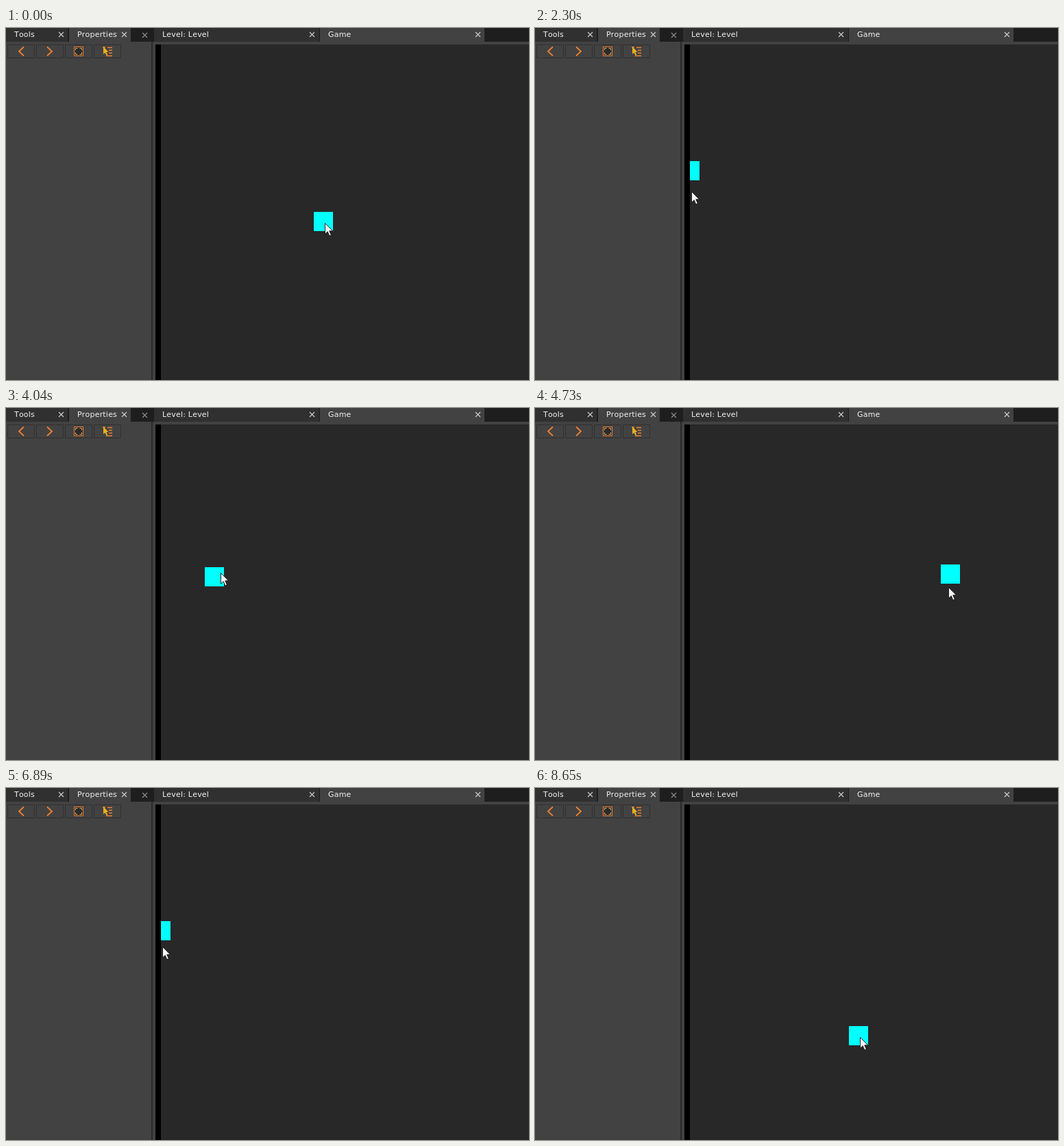
These frames come from a looping animation (763 px wide and 513 px high, 9130 ms). An HTML page:

```html
<!DOCTYPE html>
<html lang="en">
<head>
<meta charset="utf-8">
<title>Editor</title>
<style>
  html, body { margin: 0; width: 100%; height: 100%; overflow: hidden; background: #424242; }
  svg { display: block; }
  text { font: 11px "DejaVu Sans", sans-serif; font-kerning: none; letter-spacing: .2px; fill: #f2f2f2; }
  .close { stroke: #d0d0d0; stroke-width: 1.1; fill: none; }
  .button { fill: #424242; stroke: #303030; }
  .orange { stroke: #f08030; fill: none; }
</style>
</head>
<body>
<svg width="763" height="513" viewBox="0 0 763 513">
  <defs>
    <path id="cross" d="M-3.5-3.5l7 7M3.5-3.5l-7 7"/>
    <path id="button" d="M.5.5h39v19h-39z"/>
    <clipPath id="view"><path d="M226 24H763V513H226Z"/></clipPath>
  </defs>
  <path fill="#424242" d="M0 0H763V513H0Z"/>
  <path fill="#1e1e1e" d="M0 0H763V20H0Z"/>
  <path fill="#303030" d="M0 0H90V20H0ZM216 0H457V20H216Z"/>
  <path fill="#424242" d="M92 0H182V20H92ZM458 0H698V20H458Z"/>
  <path fill="#2b2b2b" d="M212 20H214V513H212Z"/>
  <path fill="#000" d="M218 24H226V513H218Z"/>
  <path fill="#282828" d="M226 24H763V513H226Z"/>

  <text x="12" y="13">Tools</text>
  <text x="104" y="13">Properties</text>
  <text x="228" y="13">Level: Level</text>
  <text x="470" y="13">Game</text>
  <g class="close">
    <use href="#cross" x="80.5" y="9.5"/>
    <use href="#cross" x="172.5" y="9.5"/>
    <use href="#cross" x="202.5" y="10.5" opacity=".65"/>
    <use href="#cross" x="446.5" y="9.5"/>
    <use href="#cross" x="688.5" y="9.5"/>
  </g>

  <g class="button">
    <use href="#button" x="2" y="24"/>
    <use href="#button" x="44" y="24"/>
    <use href="#button" x="86" y="24"/>
    <use href="#button" x="128" y="24"/>
  </g>
  <path class="orange" stroke-width="1.8" d="M26 27.5L19 34L26 40.5M60 27.5L67 34L60 40.5"/>
  <path fill="#2a2a2a" stroke="#f08030" d="M99.5 27.5h13v13h-13z"/>
  <path stroke="#d8b070" fill="none" d="M101.5 32.5v-3h3M107.5 29.5h3v3M110.5 35.5v3h-3M104.5 38.5h-3v-3"/>
  <path class="orange" stroke-width="1.6" d="M141 28H145M148 28.5H155M150 32.5H155M150 36.5H155M146 40.5H155"/>
  <path fill="#e8b020" d="M142 27v11l2.5-2 2 4 1.8-1-2-4h3.2z"/>

  <g clip-path="url(#view)"><rect id="box" width="28" height="28" fill="#0ff"/></g>
  <path id="cursor" fill="#f4f4f6" stroke="#151515" stroke-width=".9" stroke-linejoin="round"
        d="M.5.5V16.2L4.2 12.8L6.8 18.8L9.4 17.7L6.8 11.8H11.6Z"/>
</svg>
<script>
const LOOP = 9130, START = 465, STEP = 79.1;
const WALL = 226, HALF = 14, OFFSET = 2;

// Where the pointer turns: step, x, y.
const turns = [
  [0, 465, 284], [5, 214, 347], [11, 228, 237], [12, 228, 229], [18, 220, 95], [24, 228, 238],
  [29, 420, 367], [33, 585, 316], [34, 608, 290], [37, 643, 143], [42, 420, 374],
  [45, 306, 248], [46, 313, 240], [49, 530, 158], [52, 610, 228], [61, 500, 338],
  [63, 376, 265], [64, 328, 223], [73, 208, 49], [82, 228, 231], [93, 300, 430],
  [99, 547, 260], [103, 474, 363]
];
const last = turns.length - 1;

const box = document.getElementById("box");
const cursor = document.getElementById("cursor");

function slope(i, axis) {
  const a = turns[i], b = turns[i + 1];
  return a && b ? (b[axis] - a[axis]) / (b[0] - a[0]) : 0;
}

// Harmonic tangents keep the curve from overshooting its turns.
function tangent(i, axis) {
  const before = slope(i - 1, axis), after = slope(i, axis);
  return before * after > 0 ? 2 * before * after / (before + after) : 0;
}

function along(step, axis) {
  const s = Math.min(Math.max(step, 0), turns[last][0]);
  const i = Math.min(turns.findLastIndex(turn => turn[0] <= s), last - 1);
  const a = turns[i], b = turns[i + 1];
  const span = b[0] - a[0], u = (s - a[0]) / span, v = 1 - u;
  return a[axis] * (1 + 2 * u) * v * v + b[axis] * (3 - 2 * u) * u * u
    + span * u * v * (tangent(i, axis) * v - tangent(i + 1, axis) * u);
}

const pointer = step => [1, 2].map(axis => Math.round(along(step, axis)));

// The box trails the pointer by one step and stops at the left wall.
function draw(time) {
  const step = Math.max(0, Math.floor((time - START) / STEP) + 1);
  const [x, y] = pointer(step);
  const [bx, by] = pointer(step - 1);
  cursor.setAttribute("transform", `translate(${x} ${y})`);
  box.setAttribute("x", Math.max(WALL, bx - OFFSET) - HALF);
  box.setAttribute("y", by - OFFSET - HALF);
}

const begin = performance.now();
function tick() {
  draw((performance.now() - begin) % LOOP);
  requestAnimationFrame(tick);
}
draw(0);
requestAnimationFrame(tick);
</script>
</body>
</html>
```
